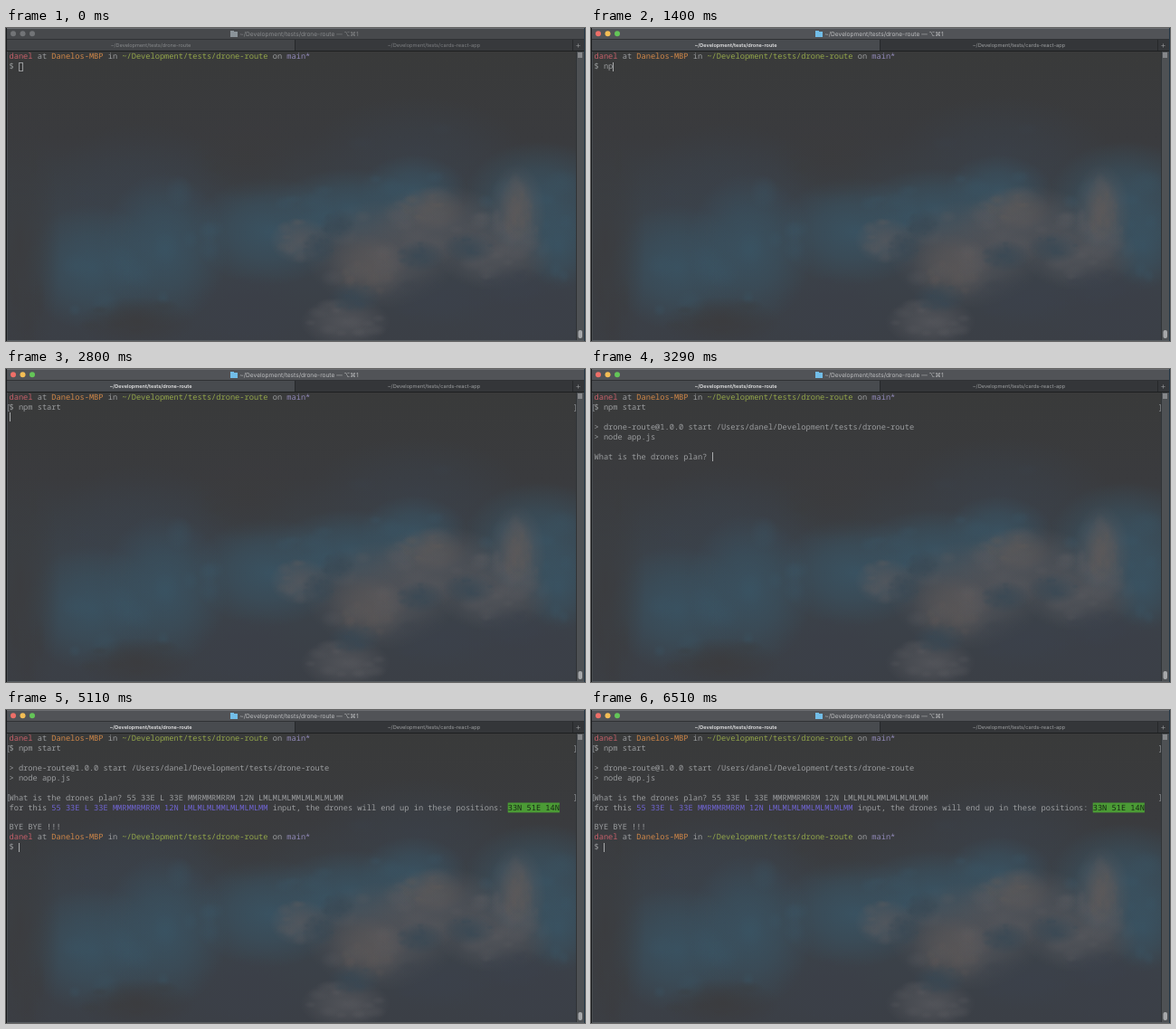
These frames come from a looping animation (640 by 346 pixels, 6.58 s). An HTML page with a canvas:

```html
<!DOCTYPE html>
<html lang="en">
<head>
<meta charset="utf-8">
<title>Terminal session</title>
<style>
html, body { margin: 0; width: 100%; height: 100%; overflow: hidden; background: #333538; }
canvas { display: block; }
</style>
</head>
<body>
<canvas id="stage" width="640" height="346"></canvas>
<script>
const W = 640, H = 346, LOOP = 6580;
const COL = 5.2, ROW = 10.9, LEFT = 3.5, TOP = 31.6;
const ctx = document.getElementById('stage').getContext('2d');

const GREY = '#9b9d9f', PINK = '#c35f68', ORANGE = '#d08748',
      GREEN = '#93a64a', LILAC = '#9189b8', VIOLET = '#6f64d2';
const USER = 'danel', HOST = 'Danelos-MBP', PATH = '~/Development/tests/drone-route';
const PLAN = '55 33E L 33E MMRMMRMRRM 12N LMLMLMLMMLMLMLMLMM';
const QUESTION = 'What is the drones plan? ';
const COMMAND = 'npm start';
const KEY_TIMES = [1260, 1330, 1470, 1680, 1750, 1890, 1960, 2100, 2170];
const FOCUS = 490, RUN = 2590, ASK = 3150, PASTE = 4130, ANSWER = 4830;

const PROMPT = [[USER, PINK], [' at '], [HOST, ORANGE], [' in '], [PATH, GREEN], [' on '], ['main*', LILAC]];

function rect(c, x, y, w, h, color) {
  c.fillStyle = color;
  c.fillRect(x, y, w, h);
}

function makeSky() {
  const canvas = document.createElement('canvas');
  canvas.width = W;
  canvas.height = H;
  const c = canvas.getContext('2d');
  let seed = 11;
  const random = () => (seed = seed * 16807 % 2147483647) / 2147483647;

  function blob(x, y, rx, ry, rgb, alpha) {
    c.save();
    c.translate(x, y);
    c.scale(rx, ry);
    const g = c.createRadialGradient(0, 0, 0, 0, 0, 1);
    g.addColorStop(0, `rgba(${rgb},${alpha})`);
    g.addColorStop(0.5, `rgba(${rgb},${alpha * 0.6})`);
    g.addColorStop(1, `rgba(${rgb},0)`);
    c.fillStyle = g;
    c.fillRect(-1, -1, 2, 2);
    c.restore();
  }
  // A soft body broken up by small puffs.
  function cloud(rgb, alpha, puffs, shapes) {
    for (const [x, y, rx, ry] of shapes) {
      blob(x, y, rx, ry, rgb, alpha);
      for (let i = 0; i < puffs; i++) {
        const a = random() * 2 * Math.PI, d = Math.sqrt(random()) * 0.8, s = 0.1 + random() * 0.18;
        blob(x + Math.cos(a) * d * rx, y + Math.sin(a) * d * ry, rx * s, ry * s, rgb, alpha * 0.4);
      }
    }
  }

  const base = c.createLinearGradient(0, 25, 0, H);
  base.addColorStop(0, '#393a3a');
  base.addColorStop(0.3, '#3a3b3e');
  base.addColorStop(0.6, '#3b434b');
  base.addColorStop(1, '#3b3f46');
  rect(c, 0, 0, W, H, base);

  cloud('58,66,76', 0.6, 4, [[150, 190, 110, 85], [455, 140, 120, 65]]);
  cloud('57,84,100', 0.85, 6, [[95, 265, 75, 70], [175, 245, 70, 85], [290, 225, 85, 60], [380, 200, 85, 45], [450, 180, 60, 40], [590, 190, 85, 65], [610, 240, 40, 50]]);
  cloud('59,59,61', 0.8, 5, [[15, 240, 45, 160], [265, 140, 65, 50], [145, 325, 65, 28]]);
  cloud('59,63,72', 0.8, 5, [[270, 315, 70, 45], [580, 315, 90, 45]]);
  cloud('88,89,94', 0.75, 14, [[415, 250, 85, 60], [480, 215, 75, 42], [565, 205, 32, 55], [540, 250, 65, 40], [325, 235, 34, 26], [375, 325, 50, 28]]);
  cloud('98,90,87', 0.5, 10, [[400, 265, 45, 38], [470, 200, 38, 24], [565, 200, 20, 38]]);
  cloud('56,72,84', 0.8, 8, [[345, 243, 20, 18], [367, 218, 20, 18], [458, 252, 28, 18], [512, 243, 30, 18], [385, 298, 30, 18]]);
  cloud('59,65,75', 0.75, 10, [[480, 300, 60, 30], [560, 285, 42, 24]]);
  return canvas;
}

function label(text, x, size, y, color, weight = 400) {
  ctx.font = `${weight} ${size}px Inter, "DejaVu Sans", sans-serif`;
  ctx.textAlign = 'center';
  ctx.fillStyle = color;
  ctx.fillText(text, x, y);
}

function drawChrome(focused) {
  rect(ctx, 0, 0, W, 13, focused ? '#515357' : '#47494c');
  rect(ctx, 0, 0, W, 1, '#6a6c70');
  rect(ctx, 0, 12, W, 1, '#303235');
  rect(ctx, 0, 13, 319, 12, focused ? '#484b4f' : '#434548');
  rect(ctx, 319, 13, 321, 12, focused ? '#343639' : '#37393c');
  rect(ctx, 319, 13, 1, 12, '#26282a');
  rect(ctx, 626, 13, 1, 12, '#26282a');
  rect(ctx, 0, 25, W, 1, '#1d1f20');

  ['#ee6f68', '#f3bd55', '#64c558'].forEach((color, i) => {
    ctx.fillStyle = focused ? color : '#727477';
    ctx.beginPath();
    ctx.arc(8 + i * 10.5, 6.3, 3, 0, 7);
    ctx.fill();
  });
  const folder = focused ? '#72bde8' : '#8b9399';
  rect(ctx, 248, 3, 4, 2, folder);
  rect(ctx, 248, 4, 8, 6, folder);

  label(PATH + ' — ⌥⌘1', 324, 6.6, 6.8, focused ? '#bcbdbf' : '#888a8c');
  label(PATH, 160, 5.55, 19.2, focused ? '#e4e4e5' : '#87898b', focused ? 600 : 400);
  label('~/Development/tests/cards-react-app', 473, 5.7, 19.2, focused ? '#9b9d9f' : '#7c7e80');
  label('+', 632.5, 9, 19, '#8b8d8f');

  rect(ctx, 630, 26, 9, H - 26, '#4e5154');
  rect(ctx, 630, 26, 1, H - 26, '#303336');
  rect(ctx, 632, 27, 5, 6, '#85878a');
  ctx.fillStyle = '#a6a8aa';
  ctx.beginPath();
  ctx.roundRect(632.5, 334, 4.5, 9, 2);
  ctx.fill();
  rect(ctx, 0, 0, 1, H, '#17191b');
  rect(ctx, 1, 26, 1, H - 26, '#4b4f53');
  rect(ctx, 639, 0, 1, H, '#243746');
  rect(ctx, 1, H - 1, 638, 1, '#555a5e');
}

const rowY = row => TOP + row * ROW;

// Draws runs of [text, colour, background] on the character grid.
function line(row, runs) {
  ctx.font = '300 8.667px "Noto Sans Mono", "DejaVu Sans Mono", monospace';
  ctx.textAlign = 'left';
  let col = 0;
  for (const [text, color = GREY, back] of runs) {
    if (back) rect(ctx, LEFT + col * COL, rowY(row) - 5.4, text.length * COL, ROW, back);
    ctx.fillStyle = color;
    for (const ch of text) ctx.fillText(ch, LEFT + COL * col++, rowY(row) + 0.3);
  }
}

function cursor(row, col, focused = true) {
  const x = Math.round(LEFT + col * COL), y = Math.round(rowY(row) - 5);
  if (focused) return rect(ctx, x, y, 1, 10, '#a9abad');
  ctx.strokeStyle = '#97999b';
  ctx.lineWidth = 1;
  ctx.strokeRect(x + 0.5, y + 0.5, 4, 9);
}

function brackets(row) {
  const y = Math.round(rowY(row) - 4);
  for (const [x, tick] of [[2, 2], [629, 628]]) {
    rect(ctx, x, y, 1, 8, '#707376');
    rect(ctx, tick, y, 2, 1, '#707376');
    rect(ctx, tick, y + 7, 2, 1, '#707376');
  }
}

function drawSession(t) {
  const typed = KEY_TIMES.filter(k => t >= k).length;
  line(0, PROMPT);
  line(1, [['$ ' + COMMAND.slice(0, typed)]]);
  if (t < RUN) return cursor(1, 2 + typed, t >= FOCUS);

  brackets(1);
  if (t < ASK) return cursor(2, 0);

  const plan = t >= PASTE ? PLAN : '';
  line(3, [[`> drone-route@1.0.0 start /Users/${USER}/Development/tests/drone-route`]]);
  line(4, [['> node app.js']]);
  line(6, [[QUESTION + plan]]);
  if (t < ANSWER) return cursor(6, QUESTION.length + plan.length);

  brackets(6);
  line(7, [['for this '], [PLAN, VIOLET], [' input, the drones will end up in these positions: '], ['33N 51E 14N', '#172515', '#4b9b35']]);
  line(9, [['BYE BYE !!!']]);
  line(10, PROMPT);
  line(11, [['$ ']]);
  cursor(11, 2);
}

const sky = makeSky();
ctx.textBaseline = 'middle';
ctx.textRendering = 'geometricPrecision';

function frame() {
  const t = performance.now() % LOOP;
  ctx.drawImage(sky, 0, 0);
  drawChrome(t >= FOCUS);
  drawSession(t);
  requestAnimationFrame(frame);
}
frame();
</script>
</body>
</html>
```
